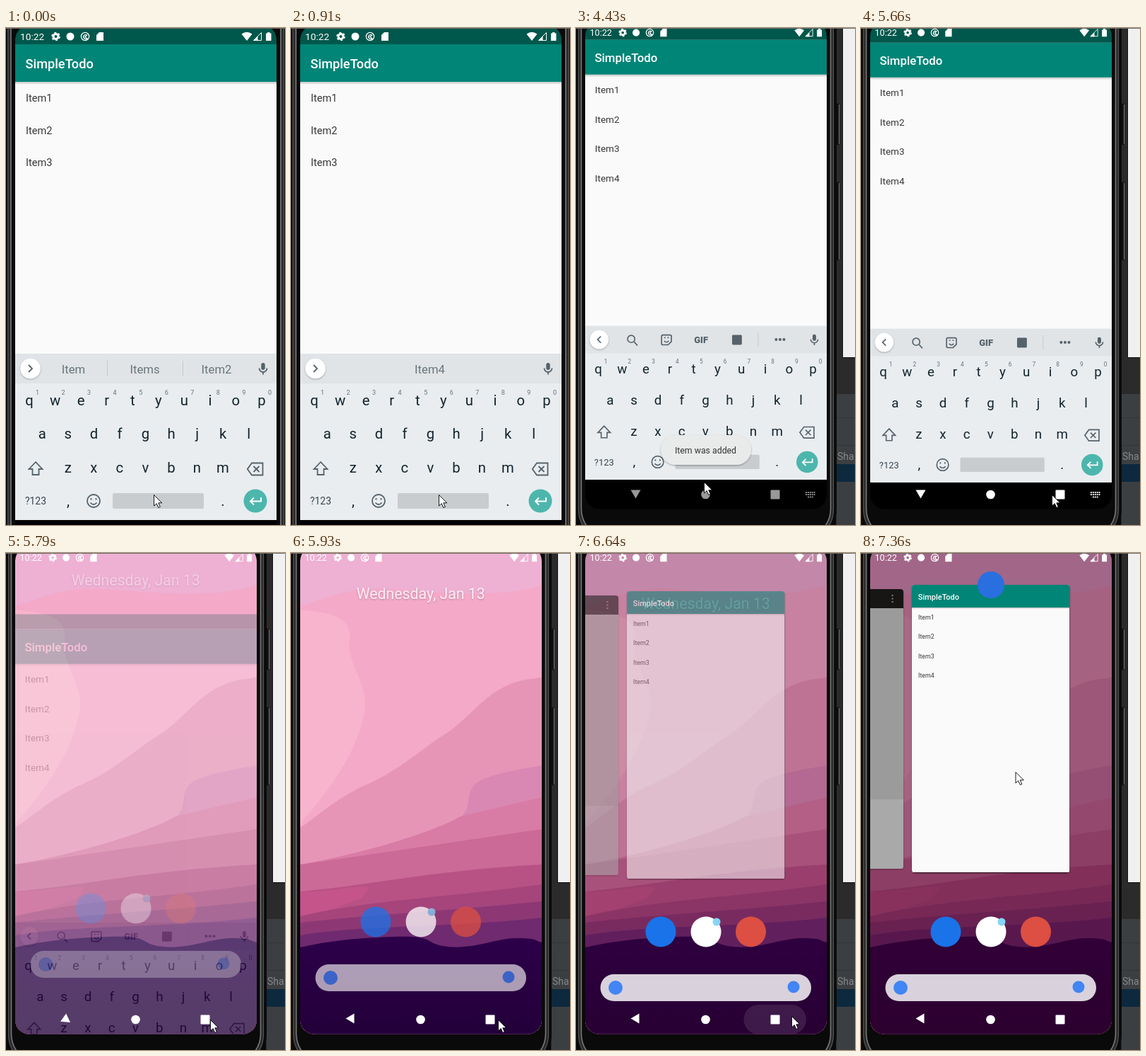
An HTML page that plays this animation: 395x702 px, repeating every 8 s.

```html
<!DOCTYPE html>
<html lang="en">
<head>
<meta charset="utf-8">
<title>Todo list demo</title>
<style>
html, body { margin: 0; height: 100%; overflow: hidden; background: #0a0a0a; }
svg { display: block; width: 100vw; height: 100vh; font-family: Roboto, "Open Sans", sans-serif; }
.mid { text-anchor: middle; }
.line { fill: none; stroke: #56626a; stroke-width: 1.8; }
.gray { fill: #56626a; }
.word { font-size: 16.7px; fill: #69757b; text-anchor: middle; }
.key { font-size: 20.3px; fill: #13242c; text-anchor: middle; }
.hint { font-size: 9px; fill: #66727a; text-anchor: middle; }
</style>
</head>
<body>
<svg viewBox="0 0 395 702">
<defs>
  <clipPath id="glass"><rect x="13" y="-5" width="370" height="745" rx="22"/></clipPath>
  <clipPath id="cardClip"><rect x="72" y="45" width="223.5" height="406.5" rx="4"/></clipPath>
  <linearGradient id="shade" x2="0" y2="1"><stop stop-opacity=".22"/><stop offset="1" stop-opacity="0"/></linearGradient>
  <linearGradient id="hill" x2="0" y2="1"><stop stop-color="#2d004a"/><stop offset="1" stop-color="#220038"/></linearGradient>
  <filter id="soft" x="-30%" y="-30%" width="160%" height="160%"><feDropShadow dx="0" dy="1" stdDeviation="1" flood-opacity=".35"/></filter>
</defs>

<rect width="395" height="702" fill="#0a0a0a"/>
<g id="near">
  <path d="M5 0V702M391 0V702" stroke="#2a2a2a" stroke-width="4"/>
  <path d="M2.7 0V702M393.3 0V702" stroke="#555" stroke-width="1.3"/>
  <path d="M7 0V702M389 0V702" stroke="#777" stroke-width="1.7"/>
</g>
<g id="far">
  <path d="M368 0H395V702H368Z" fill="#2b2b2b"/>
  <path d="M369 517H395V702H369Z" fill="#3c3f41"/>
  <path d="M369 550.5H395M369 589.5H395" stroke="#323537"/>
  <path d="M369 616H395V641H369Z" fill="#0d293e"/>
  <path d="M377.5 -1H396V465.5H377.5Z" fill="#f0f0f0" stroke="#111"/>
  <text x="370" y="610" font-size="14" fill="#85888a">Sha</text>
  <path d="M369 107H373V165H369ZM369 218H373V328H369Z" fill="#111"/>
  <path d="M372.5 108V164M372.5 219V327" stroke="#777"/>
  <rect x="-1" y="-50" width="370" height="778" rx="48" fill="#0a0a0a"/>
  <rect x="3.5" y="-50" width="361" height="775" rx="45" fill="#2a2a2a" stroke="#555" stroke-width="1.2"/>
  <rect x="7.5" y="-50" width="353" height="771" rx="42" fill="#0a0a0a" stroke="#777" stroke-width="1.6"/>
</g>

<g id="screen" clip-path="url(#glass)">
  <rect x="0" y="-10" width="400" height="760"/>

  <g id="home" class="flat">
    <g id="wall"></g>
    <rect id="dim" x="10" y="-10" width="350" height="700" fill="#370020"/>
    <text id="date" class="mid" x="183.7" y="78.5" font-size="21.3" fill="#fff" filter="url(#soft)">Wednesday, Jan 13</text>
    <g id="dock">
      <circle cx="120" cy="535" r="21.5" fill="#1a73e8"/>
      <circle cx="184" cy="535" r="21.5" fill="#fff"/>
      <circle cx="199" cy="521" r="5.5" fill="#84d5f7"/>
      <circle cx="247.5" cy="535" r="21.5" fill="#dc4f42"/>
      <rect x="34.5" y="595" width="298.5" height="38" rx="19" fill="#d9d2dc"/>
      <circle cx="56" cy="614" r="10" fill="#4285f4"/>
      <circle cx="308" cy="613" r="8.5" fill="#4285f4"/>
    </g>
    <g id="recents">
      <rect x="3" y="51" width="57" height="395" rx="4" fill="#9b9b9b" filter="url(#soft)"/>
      <path d="M3 348H60V442a4 4 0 0 1-4 4H3Z" fill="#a9a9a9"/>
      <path d="M3 51H56a4 4 0 0 1 4 4V78H3Z" fill="#171615"/>
      <path d="M44.5 59v2M44.5 63.5v2M44.5 68v2" stroke="#777" stroke-width="2.2"/>
      <rect x="72" y="45" width="223.5" height="406.5" rx="4" filter="url(#soft)"/>
      <g clip-path="url(#cardClip)"><use href="#page" transform="translate(64.15 31.11) scale(.604)"/></g>
      <circle id="badge" cx="184" cy="45" r="19" fill="#2a6fe0"/>
    </g>
  </g>

  <g id="app">
    <path d="M13 0H383V23H13Z" fill="#00574b"/>
    <g id="page">
      <path d="M13 23H383V695H13Z" fill="#fafafa"/>
      <path d="M13 76H383V80H13Z" fill="url(#shade)"/>
      <path d="M13 23H383V76H13Z" fill="#008577"/>
      <text x="27.5" y="57" font-size="18.2" font-weight="500" fill="#fff">SimpleTodo</text>
      <g id="items" font-size="14.6" fill="#383838"></g>
    </g>
    <g id="board">
      <path d="M13 460H383V695H13Z" fill="#e9edf0"/>
      <path d="M13 460H383V502H13Z" fill="#e0e4e7"/>
      <circle cx="34.5" cy="481" r="14.3" fill="#fff" filter="url(#soft)"/>
      <path id="chevron" class="line" d="M-2.5-5L2.5 0L-2.5 5"/>
      <rect class="gray" x="361.3" y="473" width="5.4" height="10" rx="2.7"/>
      <path class="line" d="M358.5 480.5a5.5 5.5 0 0 0 11 0M364 486v3.5"/>
      <g id="words">
        <path d="M143.5 470V492M250.5 470V492" stroke="#c3c8cb"/>
        <text class="word" x="95.5" y="488">Item</text>
        <text class="word" x="196.5" y="488">Items</text>
        <text class="word" x="298" y="488">Item2</text>
      </g>
      <text id="guess" class="word" x="196.5" y="488">Item4</text>
      <g id="tools">
        <path class="line" d="M88 484.5L93 490"/>
        <circle class="line" cx="83.5" cy="480" r="5.5"/>
        <path class="line" d="M132 474H143a2 2 0 0 1 2 2V484L140 489H132a2 2 0 0 1-2-2V476a2 2 0 0 1 2-2ZM134 483q3.5 4 7 0M134 478h2M139 478h2"/>
        <text class="mid gray" x="190.5" y="486" font-size="14" font-weight="900">GIF</text>
        <rect class="gray" x="238" y="474" width="15" height="15" rx="1.5"/>
        <path d="M278 470V492" stroke="#c3c8cb"/>
        <g class="gray"><circle cx="305.5" cy="481" r="2.2"/><circle cx="311.5" cy="481" r="2.2"/><circle cx="317.5" cy="481" r="2.2"/></g>
      </g>
      <g id="keys"></g>
      <path class="line" d="M42 613L32.5 623H37.5V631H46.5V623H51.5Z"/>
      <path class="line" d="M348 614.5H363.5V631.5H348L341.8 623ZM350.5 619l8 8m0-8l-8 8"/>
      <text class="mid" x="42" y="673" font-size="14" fill="#37464e">?123</text>
      <text class="key" x="88" y="675">,</text>
      <text class="key" x="307" y="675">.</text>
      <circle class="line" cx="124" cy="668" r="9"/>
      <path class="line" d="M119.5 670.5q4.5 5 9 0M120.5 664v2.5M127.5 664v2.5"/>
      <rect x="151" y="657" width="129" height="22" rx="2" fill="#c8ccce"/>
      <circle cx="353" cy="668" r="16.5" fill="#4db6ac"/>
      <path d="M361 663v5.5H346m5-5L346 668.5l5 5" fill="none" stroke="#fff" stroke-width="1.9"/>
    </g>
  </g>

  <g fill="#fff">
    <text x="20" y="17" font-size="13.7">10:22</text>
    <circle cx="70.5" cy="12" r="3.5" fill="none" stroke="#fff" stroke-width="3"/>
    <circle cx="70.5" cy="12" r="5.5" fill="none" stroke="#fff" stroke-width="1.6" stroke-dasharray="2.88"/>
    <circle cx="91" cy="12" r="5.5"/>
    <circle cx="112" cy="12" r="5.6" fill="none" stroke="#fff" stroke-width="1.3"/>
    <path d="M115 14.5A3 3 0 1 1 114.5 10L112 12.5L116 16" fill="none" stroke="#fff" stroke-width="1.3"/>
    <path d="M132 6H138V18H128V10Z"/>
    <path d="M333.5 8.5Q341 3 348.5 8.5L341 18Z"/>
    <path d="M350.5 17.5L361.5 6.5V17.5Z" fill="none" stroke="#fff"/>
    <path d="M350 18L356.5 11.5V18ZM370 6H373.5V7.5H375.5V18H368V7.5H370Z"/>
  </g>

  <g id="over" class="flat">
    <rect id="ripple" x="237.5" y="638" width="88.5" height="42" rx="21" fill="#fff"/>
    <g id="nav" fill="#fff">
      <path id="back" d="M-7-5H7L0 7Z"/>
      <circle cx="183.5" cy="659" r="6.3"/>
      <rect x="275.5" y="652.5" width="13" height="13" rx="1"/>
      <path id="hide" d="M325 656H339M325 659H339M328 662.5H336" fill="none" stroke="#fff" stroke-width="2" stroke-dasharray="1.8 1.1"/>
    </g>
    <g id="toast">
      <rect x="120" y="575" width="128" height="42" rx="21" fill="#e9eaea" filter="url(#soft)"/>
      <text class="mid" x="183.5" y="600.5" font-size="12.3" fill="#333">Item was added</text>
    </g>
  </g>
</g>
<path d="M0 .5H395" stroke="#6b6b6b"/>
<path id="mouse" d="M.5.5V16L4.2 12.6L6.8 18.5L9.3 17.4L6.8 11.8H11.8Z" fill="#fff" stroke="#000" stroke-width=".9"/>
</svg>

<script>
const $ = id => document.getElementById(id);
const LOOP = 8000, ZOOM = .9243;

// Repaint moments with the pointer position (none = hidden)
const beats = [
  [0, 209, 659], [910, 209, 659], [1960, 124, 684], [2090], [2390, 214, 676], [2540],
  [4430, 181, 641], [4580, 198, 650], [4700, 214, 657], [4850, 215, 658], [4980, 215, 658],
  [5120, 226, 659], [5240, 238, 660], [5390, 250, 659], [5510, 262, 659], [5660, 270, 659],
  [5790, 289, 659], [5930, 293, 659], [6055, 295, 659], [6180, 295, 659], [6330, 295, 659],
  [6480, 295, 659], [6640, 305, 654], [6780, 315, 648], [6930, 243, 422], [7240, 230, 360],
  [7360, 218.5, 309]
];

const text = (cls, x, y, s) => `<text class="${cls}" x="${x}" y="${y}">${s}</text>`;
const row = (cls, s, x, y) => [...s].map((c, i) => text(cls, x + 36.55 * i, y, c)).join('');

$('keys').innerHTML = row('key', 'qwertyuiop', 33, 533) + row('hint', '1234567890', 44.5, 518) +
  row('key', 'asdfghjkl', 51.3, 580) + row('key', 'zxcvbnm', 87.7, 628);
$('items').innerHTML = [1, 2, 3, 4].map(n =>
  `<text id="item${n}" x="28" y="${59.3 + 45.1 * n}">Item${n}</text>`).join('');

// Wallpaper: each layer runs from its upper edge down to the bottom
const layers = [
  ['#eeb0d3', '0H355'],
  ['#f4a9c8', '75C40 68 75 50 120 50S280 70 355 45'],
  ['#e795b7', '388C40 370 60 350 100 330C150 310 180 280 215 258C250 235 270 205 300 190S340 180 355 175'],
  ['#d988b3', '440C100 425 190 405 235 378C262 360 240 335 270 320C300 308 330 305 355 300'],
  ['#d97ca5', '440C100 425 200 395 240 372L355 345'],
  ['#cb6a97', '440C120 425 250 405 355 390'],
  ['#b85285', '478C110 470 200 448 355 440'],
  ['#a5457c', '513C110 490 230 486 355 468'],
  ['#8d3874', '522C120 510 230 505 355 492'],
  ['#6f2a70', '540C100 525 220 530 355 515'],
  ['url(#hill)', '557C45 550 80 544 145 542S185 552 222 556S290 544 320 544S345 548 355 550']
].map(([fill, edge]) => `<path fill="${fill}" d="M13 ${edge}V690H13Z"/>`);
layers.splice(2, 0, '<path fill="#f8b4cc" d="M13 80C60 85 90 90 82 130C85 165 105 180 105 215C100 270 60 330 13 382Z"/>');
layers.splice(8, 0, '<path fill="#c4548a" d="M13 478C50 480 80 470 112 472L100 488C60 500 30 520 13 513Z"/>');
$('wall').innerHTML = layers.join('');

for (const g of document.querySelectorAll('.flat'))
  g.setAttribute('transform', `scale(${1 / ZOOM}) translate(${-13 * (1 - ZOOM)} 4.5)`);

// Linear interpolation through [time, value] points
function at(t, ...points) {
  let [t0, v0] = points[0];
  for (const [t1, v1] of points) {
    if (t < t1) return t <= t0 ? v0 : v0 + (v1 - v0) * (t - t0) / (t1 - t0);
    [t0, v0] = [t1, v1];
  }
  return v0;
}
const show = (id, on) => $(id).style.display = on ? '' : 'none';
const fade = (id, v) => $(id).style.opacity = v;
const place = (id, x, y, more = '') => $(id).setAttribute('transform', `translate(${x} ${y}) ${more}`);

function draw(now) {
  const [t, x, y] = beats.findLast(b => b[0] <= now % LOOP) || beats[0];
  const far = t >= 4430;

  show('near', !far);
  show('far', far);
  show('over', far);
  place('screen', far ? 13 * (1 - ZOOM) : 0, far ? -4.5 : 0, `scale(${far ? ZOOM : 1})`);

  show('words', t < 910);
  show('guess', t >= 910 && !far);
  show('tools', far);
  show('item4', far);
  place('chevron', 34.5, 481, `scale(${far ? -1 : 1} 1)`);

  // App drops away, home settles in
  place('app', 0, at(t, [5510, 0], [5660, 4.3], [5790, 98.5], [5930, 160]));
  place('board', 0, at(t, [5660, 0], [5790, 11]));
  fade('app', at(t, [5660, 1], [5790, .25], [5930, 0]));
  show('home', t >= 5790);
  const homeY = at(t, [5790, -33], [5930, -14], [6055, -5], [6180, 0]);
  const homeIn = at(t, [5660, 0], [5790, .35], [5930, .75], [6180, 1]);

  const open = at(t, [6480, 0], [6640, .55], [6780, 1]);
  place('date', 0, homeY);
  place('dock', 0, homeY);
  fade('date', homeIn * (1 - open));
  fade('dock', homeIn);
  fade('dim', .42 * open);
  fade('recents', open);
  place('recents', 0, 20 * (1 - open));
  show('badge', t >= 6930);

  fade('toast', at(t, [4430, 1], [5240, 0]));
  fade('nav', at(t, [4980, .6], [5240, 1]));
  show('hide', t < 5790);
  place('back', 84.5, 657.5, `rotate(${at(t, [5660, 0], [5790, -175], [5930, -270])})`);
  fade('ripple', at(t, [6180, 0], [6330, .07], [6480, .16], [6640, .1], [6780, 0]));

  show('mouse', x !== undefined);
  if (x !== undefined) place('mouse', x, y);
}

const start = performance.now();
(function tick() {
  draw(performance.now() - start);
  requestAnimationFrame(tick);
})();
</script>
</body>
</html>
```
